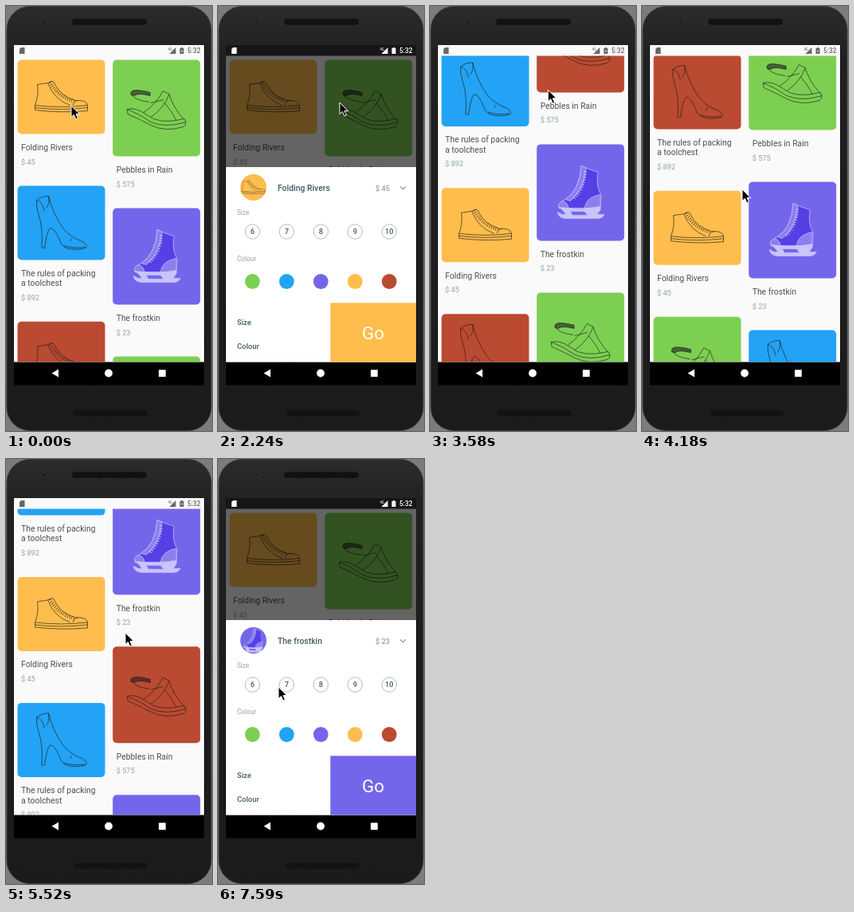
An HTML page for the animation above (8000 ms loop, 259 by 533 pixels).

```html
<!DOCTYPE html>
<html lang="en">
<head>
<meta charset="utf-8">
<title>Shoe shop</title>
<style>
  html, body { margin: 0; height: 100%; overflow: hidden; background: #7c7c7c; }
  svg { display: block; width: 100%; height: 100%; font-family: Roboto, sans-serif; }
  .ink { fill: none; stroke: #1d1d1d; stroke-width: .65; stroke-linejoin: round; }
  .title { font-size: 10.4px; fill: #505050; }
  .price { font-size: 9.2px; fill: #90a4ae; }
  .label { font-size: 8.2px; fill: #90a4ae; }
  .strong { font-weight: 500; fill: #455a64; }
  .muted { font-weight: 500; }
  .mid { text-anchor: middle; }
</style>
</head>
<body>
<svg viewBox="0 0 259 533" preserveAspectRatio="none">
  <defs>
    <clipPath id="screen"><rect x="10" y="49" width="239" height="397.4"/></clipPath>
    <clipPath id="page"><rect x="10" y="62.5" width="239" height="384"/></clipPath>
    <clipPath id="disc"><circle cx="44.5" cy="227.5" r="16.5"/></clipPath>
    <linearGradient id="body" x2="0" y2="1">
      <stop stop-color="#2b2b2c"/><stop offset=".12" stop-color="#202021"/><stop offset="1" stop-color="#1b1b1c"/>
    </linearGradient>
    <pattern id="mesh" width="3" height="3" patternUnits="userSpaceOnUse">
      <rect width="3" height="3" fill="#171717"/><circle cx="1" cy="1" r=".9" fill="#060606"/>
    </pattern>

    <g id="sneaker" class="ink">
      <path d="M25 31L38 29Q46 24 47 31Q55 46 73 51Q87 50 88 57V64Q54 67 22 63V57Q27 44 25 31Z"/>
      <path d="M22 57Q55 61 88 57M22 60Q55 64 88 60M38 29Q46 50 66 57M70 57Q70 52 76 51"/>
      <path d="M41 28Q50 46 71 52" stroke-width="4" stroke-dasharray=".6 2.2"/>
    </g>

    <g id="heel" class="ink">
      <path d="M24 18Q30 13 39 13Q45 37 58 54Q67 65 82 70Q92 77 82 79Q61 82 55 73Q47 52 41 53Q37 56 34 78H30.5Q32 52 27 38Q23 27 24 18Z"/>
      <path d="M24 18Q31 19 34 32M39 13Q41 22 36 28M58 75Q70 79 85 77M68 66L66 70"/>
    </g>

    <g id="sandal" class="ink">
      <path d="M18 62Q29 59 43 69Q58 82 90 74Q94 80 89 84Q66 91 48 82Q35 75 19 68Z"/>
      <path d="M18 62Q34 68 48 78Q66 86 92 78M46 53Q29 51 24 44M39 66Q56 54 63 39L71 43Q65 60 48 72M71 43Q76 60 89 74M65 54Q74 64 80 76M48 54L64 50"/>
      <path d="M23 44Q20 34 47 41V45Q32 41 27 45Z" fill="#1d1d1d" fill-opacity=".6"/>
    </g>

    <g id="skate" fill="#5540e6" stroke="#c9c4fb" stroke-width=".7" stroke-linejoin="round">
      <path d="M56 27Q66 32 77 35Q74 52 81 64L80 80H28Q25 74 36 69Q54 58 56 27Z"/>
      <path d="M56 27L62 30Q60 58 42 71L36 69Q54 58 56 27ZM28 80Q25 73 34 71Q40 75 40 80ZM60 80Q62 66 80 63V80Z" fill="#8b80ee"/>
      <path d="M61 34Q60 57 45 69" fill="none" stroke-width="4" stroke-dasharray=".9 2.4"/>
      <path d="M28 79Q54 83 80 78V82L76 88H85Q83 93 76 93H36Q27 92 26 85L32 88H37L33 83ZM42 84L45 89H64L60 84Z" fill="#c9c4fb" fill-rule="evenodd"/>
    </g>
  </defs>

  <rect width="259" height="533" fill="#7c7c7c"/>
  <rect x="1" y=".5" width="257" height="532" rx="29" fill="url(#body)" stroke="#3c3c3d"/>
  <circle cx="48" cy="20" r="3" fill="#1c1c1d" stroke="#333"/>
  <rect x="83" y="16" width="94" height="8" rx="4" fill="url(#mesh)"/>
  <rect x="85" y="507" width="93" height="7" rx="3.5" fill="url(#mesh)"/>
  <rect x="10" y="49" width="239" height="426.5"/>

  <g clip-path="url(#screen)">
    <rect x="10" y="49" width="239" height="398" fill="#fafafa"/>
    <g clip-path="url(#page)">
      <g id="list"></g>
      <path id="bottomGlow" fill="#3f51b5"/>
      <path id="topGlow" fill="#3f51b5"/>
    </g>
    <rect id="dim" x="10" y="49" width="239" height="398"/>
    <rect id="bar" x="10" y="49" width="239" height="13.5" fill="#161616"/>
    <g id="status">
      <path d="M17 54L19 52H23.5V60H17Z"/>
      <text x="203.5" y="55.5" font-size="4.5">4G</text>
      <path d="M213.5 52V60H205.5Z"/>
      <path d="M220 52.8V52H222V52.8H223.5V60H218.5V52.8Z"/>
      <path d="M221.5 54L220 57H221L220.6 59L222.2 56H221.2Z" fill="#ddd"/>
      <text x="228" y="59" font-size="8.4" font-weight="500">5:32</text>
    </g>
    <g id="sheet"></g>
  </g>

  <g fill="#fff">
    <path d="M57.5 460.5L66 455.5V465.5Z"/><circle cx="129" cy="460.5" r="4.9"/>
    <rect x="192" y="456.3" width="8.8" height="8.8" rx=".6"/>
  </g>
  <path id="cursor" d="M0 0V14.5L3.4 11.4L5.8 17L8.4 15.9L6 10.5H10.6Z" stroke="#fff"/>
</svg>

<script>
const LOOP = 8000, TICK = 148.8;   // the screen refreshes once per tick
const RED = '#ba4a31';
const KINDS = [
  { id: 'sneaker', color: '#ffbd4d', height: 93, price: 45, lines: ['Folding Rivers'] },
  { id: 'sandal', color: '#7dcf52', height: 121, price: 575, lines: ['Pebbles in Rain'] },
  { id: 'heel', color: '#22a3f5', height: 93, price: 892, lines: ['The rules of packing', 'a toolchest'] },
  { id: 'skate', color: '#7466eb', height: 121, price: 23, lines: ['The frostkin'] },
];
const $ = id => document.getElementById(id);
const text = (x, y, cls, str) => `<text x="${x}" y="${y}" class="${cls}">${str}</text>`;

// Staggered grid: each card goes to the shorter column, every fifth is red.
function buildList() {
  const ends = [67.5, 67.5];
  let html = '';
  for (let i = 0; i < 20; i++) {
    const kind = KINDS[i % 4], col = ends[0] <= ends[1] ? 0 : 1;
    const extra = (kind.lines.length - 1) * 12.3, h = kind.height;
    html += `<g transform="translate(${col ? 134.2 : 14.5} ${ends[col]})">
      <rect width="110" height="${h}" rx="5" fill="${i % 5 == 4 ? RED : kind.color}"/>
      <use href="#${kind.id}"/>
      ${kind.lines.map((s, j) => text(4.5, h + 20.5 + j * 12.3, 'title', s)).join('')}
      ${text(4.5, h + 38 + extra, 'price', '$ ' + kind.price)}</g>`;
    ends[col] += h + 65 + extra;
  }
  $('list').innerHTML = html;
}

function buildSheet(kind) {
  const [yellow, green, blue, purple] = KINDS.map(k => k.color);
  const options = [green, blue, purple, yellow, RED].map((color, i) => {
    const x = 43.3 + 43 * i;
    return `<circle cx="${x}" cy="283" r="9.2" fill="none" stroke="#a9b3b8" stroke-width=".9"/>
      ${text(x, 286.4, 'price strong mid', 6 + i)}
      <circle cx="${x}" cy="345.5" r="9.4" fill="${color}"/>`;
  });
  $('sheet').innerHTML = `<rect x="10" y="202" width="239" height="245" fill="#fff"/>
    <circle cx="44.5" cy="227.5" r="16.5" fill="${kind.color}"/>
    <g clip-path="url(#disc)"><use href="#${kind.id}"
      transform="translate(44.5 227.5) scale(.45) translate(-55 ${-kind.height / 2})"/></g>
    ${text(75, 232, 'title strong', kind.lines[0])}
    ${text(198, 232, 'price muted', '$ ' + kind.price)}
    <path d="M229.3 226.5L232.6 229.8L235.9 226.5" fill="none" stroke="#78909c" stroke-width="1.1"/>
    ${text(24, 262, 'label', 'Size')}${text(24, 320, 'label', 'Colour')}
    ${options.join('')}
    <g font-size="9.4">${text(24, 399.5, 'strong', 'Size')}${text(24, 429.5, 'strong', 'Colour')}</g>
    <rect x="141.3" y="372.3" width="107.7" height="74.7" fill="${kind.color}"/>
    <text x="195" y="418" class="mid" font-size="22.4" fill="#fff">Go</text>`;
}

// Progress from 0 to 1 between two ticks, plain or eased.
const ramp = (n, from, to) => Math.min(1, Math.max(0, (n - from) / (to - from)));
const easeOut = p => p * (2 - p);
const smooth = p => p * p * (3 - 2 * p);

const sheetAt = n => smooth(ramp(n, 3, 6)) - ramp(n, 15, 17) + ramp(n, 45, 47);
const scrollAt = n => 154 * ramp(n, 19, 21) + 995 * easeOut(ramp(n, 21, 28))
  + 315 * ramp(n, 28, 31) - 1464 * smooth(ramp(n, 33, 40));
const bottomPull = n => ramp(n, 30, 32) - ramp(n, 32, 35);
const topPull = n => ramp(n, 39, 40) - ramp(n, 41, 45);

// Pointer moves: start tick, end tick, where to.
const MOVES = [
  [7, 10, 177, 234], [10, 12, 153, 121], [16, 18, 154, 440], [18, 21, 154, 74], [23, 28, 126, 230],
  [29, 32, 126, 58], [33, 40, 168, 338], [40, 41, 170, 442], [45, 46, 183, 307], [48, 51, 76, 286],
];
function pointerAt(n) {
  let x = 82, y = 125;
  for (const [from, to, toX, toY] of MOVES) {
    const p = ramp(n, from, to);
    x += (toX - x) * p;
    y += (toY - y) * p;
  }
  return [x, y];
}

function glow(id, edge, dir, pull) {
  const side = edge + dir * 27 * pull, bend = edge + dir * 68 * pull;
  $(id).setAttribute('d', `M10 ${edge}V${side}Q129.5 ${bend} 249 ${side}V${edge}Z`);
  $(id).setAttribute('opacity', .47 * easeOut(pull));
}

let shown;
function draw() {
  const n = Math.floor(performance.now() % LOOP / TICK);
  const open = sheetAt(n), kind = KINDS[n < 25 ? 0 : 3];
  if (kind != shown) buildSheet(shown = kind);
  $('list').setAttribute('transform', `translate(0 ${-scrollAt(n)})`);
  $('sheet').setAttribute('transform', `translate(0 ${(1 - open) * 245})`);
  $('dim').setAttribute('opacity', .6 * open);
  $('bar').setAttribute('opacity', open ? 1 : 0);
  $('status').setAttribute('fill', open ? '#fff' : '#666');
  $('cursor').setAttribute('transform', `translate(${pointerAt(n)})`);
  glow('bottomGlow', 447, -1, bottomPull(n));
  glow('topGlow', 62.5, 1, topPull(n));
  requestAnimationFrame(draw);
}

buildList();
draw();
</script>
</body>
</html>
```
